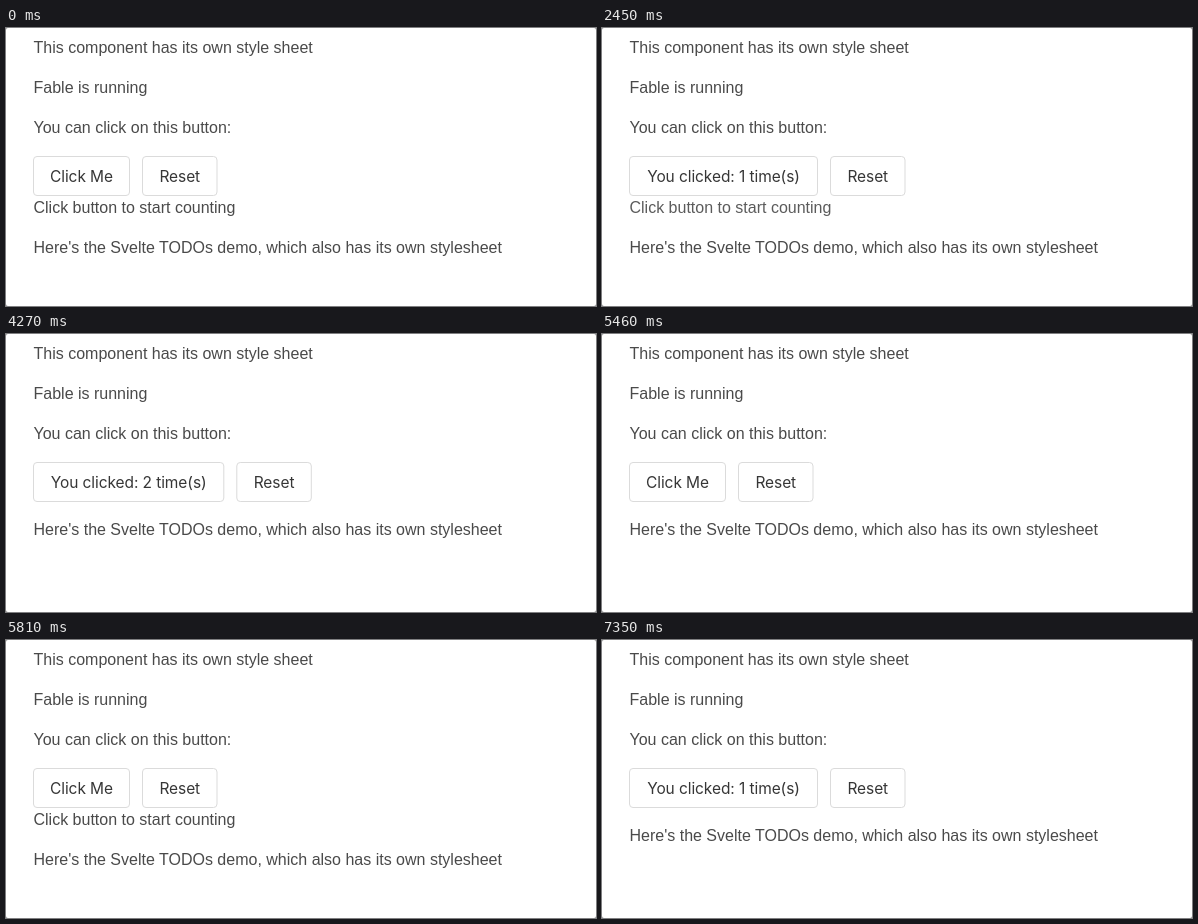
An HTML page for the animation above (8 s loop, 590 px wide and 278 px high).

```html
<!DOCTYPE html>
<html lang="en">
<head>
<meta charset="utf-8">
<title>Click counter</title>
<style>
  html, body { margin: 0; width: 100%; height: 100%; overflow: hidden; background: #888; }
  svg { display: block; }
  text { font: 16px "Liberation Sans", Arial, sans-serif; fill: #4a4a4a; }
  .button rect { fill: #fff; stroke: #dbdbdb; }
  .button text {
    font: 15.5px Inter, sans-serif;
    letter-spacing: -.08px;
    fill: #363636;
    text-anchor: middle;
  }
</style>
</head>
<body>
<svg width="590" height="278" viewBox="0 0 590 278">
  <clipPath id="reveal"><rect id="revealBox" y="168.5" width="590" height="24"/></clipPath>
  <rect width="590" height="278" rx="2" fill="#fff"/>
  <text x="27.5" y="25">This component has its own style sheet</text>
  <text x="27.5" y="65">Fable is running</text>
  <text x="27.5" y="105">You can click on this button:</text>
  <g class="button" id="counter"><rect y="128.5" height="39" rx="3.5"/><text y="154"></text></g>
  <g class="button" id="reset"><rect y="128.5" height="39" rx="3.5"/><text y="154">Reset</text></g>
  <g clip-path="url(#reveal)"><text id="hint" x="27.5" y="185">Click button to start counting</text></g>
  <text id="footer" x="27.5" y="225">Here's the Svelte TODOs demo, which also has its own stylesheet</text>
</svg>
<script>
const LOOP = 8000, STEP = 70, DURATION = 400;
const LEFT = 27.5, GAP = 13, RESET_WIDTH = 74.5, HINT_HEIGHT = 24;
const COUNTER_WIDTHS = [96, 188, 190.3, 190.8];
const CLICKS = [[0, 0], [2450, 1], [4270, 2], [4690, 3], [5460, 0], [6930, 1]];
const FADES = [2410, 6890], SLIDE = 5465;

const byId = id => document.getElementById(id);
const clamp = v => Math.min(1, Math.max(0, v));
const cubicOut = p => 1 - (1 - p) ** 3;

function placeButton(id, x, width, label) {
  const [box, text] = byId(id).children;
  box.setAttribute("x", x);
  box.setAttribute("width", width);
  text.setAttribute("x", x + width / 2);
  if (text.textContent !== label) text.textContent = label;
}

// The hint slides open but fades out, leaving its space until it is gone.
function hintState(time) {
  if (time >= SLIDE && time < FADES[1]) {
    return { open: cubicOut(clamp((time - SLIDE) / DURATION)), opacity: 1 };
  }
  const start = time < SLIDE ? FADES[0] : FADES[1];
  const opacity = 1 - clamp((time - start) / DURATION);
  return { open: opacity > 0 ? 1 : 0, opacity };
}

function draw(time) {
  const count = CLICKS.filter(([at]) => at <= time).pop()[1];
  const width = COUNTER_WIDTHS[count];
  placeButton("counter", LEFT, width, count ? `You clicked: ${count} time(s)` : "Click Me");
  placeButton("reset", LEFT + width + GAP, RESET_WIDTH, "Reset");

  const { open, opacity } = hintState(time);
  byId("revealBox").setAttribute("height", open * HINT_HEIGHT);
  byId("hint").setAttribute("opacity", opacity);
  byId("footer").setAttribute("y", 201 + Math.round(open * HINT_HEIGHT));
}

const origin = performance.now();
function tick() {
  const time = (performance.now() - origin) % LOOP;
  draw(Math.floor(time / STEP) * STEP);
  requestAnimationFrame(tick);
}
tick();
</script>
</body>
</html>
```
